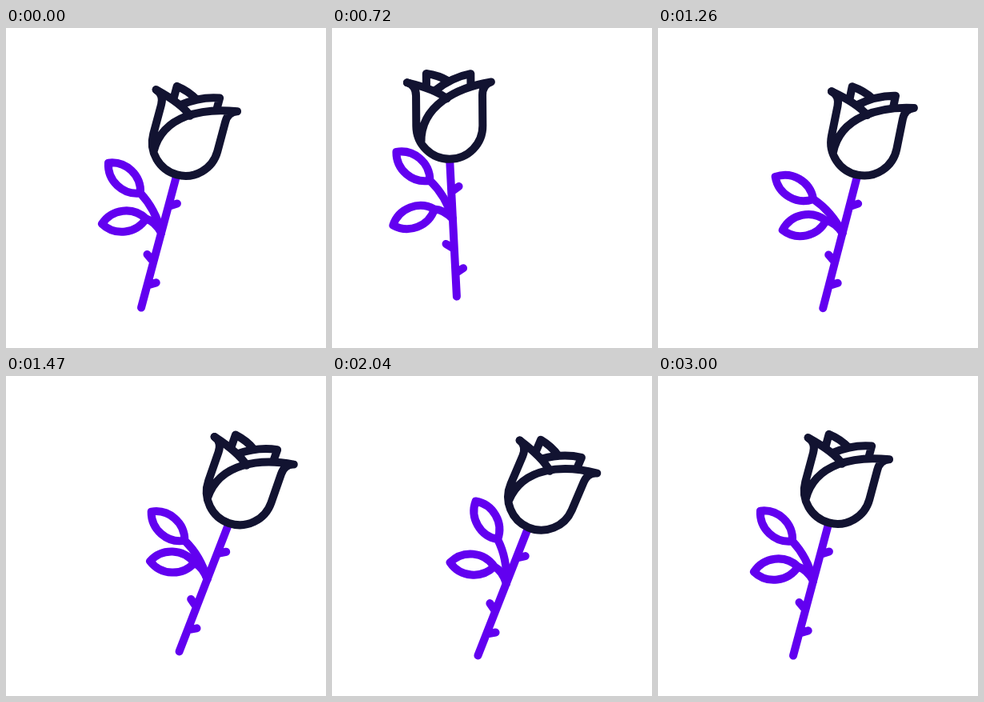
These frames come from a looping animation (400 px wide and 400 px high, 3090 ms). An HTML page:

```html
<!DOCTYPE html>
<html lang="en">
<head>
<meta charset="utf-8">
<title>Swaying rose</title>
<style>
  html, body { margin: 0; width: 100%; height: 100%; overflow: hidden; background: #fff; }
  svg { display: block; width: 100vw; height: 100vh; }
  g { fill: none; stroke-width: 10; stroke-linecap: round; stroke-linejoin: round; }
  .green { stroke: #6200f0; }
  .bloom { stroke: #121331; }
</style>
</head>
<body>
<svg viewBox="0 0 400 400">
  <g id="rose">
    <g class="green">
      <path d="M0 0V-168M0 -131L9.7 -137.4M0 -59.5L-10 -66.3M0 -29L10 -35"/>
      <g id="upper">
        <path d="M0 0Q-14.5 -26.5 -38 -41A36 36 0 0 0 -86.5 -67.2A36 36 0 0 0 -38 -41"/>
      </g>
      <g id="lower">
        <path d="M0 0Q-11.6 -11.7 -23 -12A36 36 0 0 0 -74.5 8.5A36 36 0 0 0 -23 -12"/>
      </g>
    </g>
    <g id="bloom" class="bloom">
      <path d="M-28.5 -91V-107.5C-18 -106 -9 -103 -1 -98"/>
      <path d="M-18 -86C-4 -97 10 -104 27 -107V-92"/>
      <path d="M-52.5 -96.5C-34 -92 -15 -86 -3 -76"/>
      <path d="M-52.5 -96.5C-44 -94 -41.5 -88 -41.5 -80V-42A41.5 41.5 0 0 0 41.5 -42V-80C41.5 -88 44 -94 52.5 -96.5C10 -90 -36 -68 -35.5 -22"/>
    </g>
  </g>
</svg>
<script>
const LOOP = 3090, STEP = 30, END = 3000;

// Each part swings from rest through its turning points [time, value] and back to rest.
function swing(rest, ...turns) {
  const keys = [[0, rest], ...turns, [END, rest]];
  return t => {
    const i = Math.max(1, keys.findIndex(key => key[0] >= t));
    const [t0, from] = keys[i - 1], [t1, to] = keys[i];
    const ease = (1 - Math.cos(Math.PI * (t - t0) / (t1 - t0))) / 2;
    return from + (to - from) * ease;
  };
}

const footX = swing(169, [270, 148.5], [530, 150], [1520, 217], [2330, 168.7]);
const footY = swing(349.6, [500, 328.6], [1100, 352.3], [1620, 342.5], [2130, 350]);
const lean = swing(15, [520, -4.8], [1760, 25], [2450, 15]);
const nod = swing(0, [400, 5.5], [1200, -3.2], [2000, 1.6]);
const upperLift = swing(0, [300, 20.5], [530, 20.5], [1240, -12.5], [2100, 10.5]);
const lowerLift = swing(0, [260, 13], [1180, -6], [1740, 10.6], [2300, 1.2]);

function place(id, x, y, angle) {
  document.getElementById(id).setAttribute("transform", `translate(${x} ${y}) rotate(${angle})`);
}

function draw(now) {
  const t = Math.min(END, Math.floor((now % LOOP) / STEP) * STEP);
  place("rose", footX(t), footY(t), lean(t));
  place("bloom", 0, -171.5, nod(t));
  place("upper", 0, -97, upperLift(t));
  place("lower", 0, -97, lowerLift(t));
}

const start = performance.now();
function tick() {
  draw(performance.now() - start);
  requestAnimationFrame(tick);
}
tick();
</script>
</body>
</html>
```
